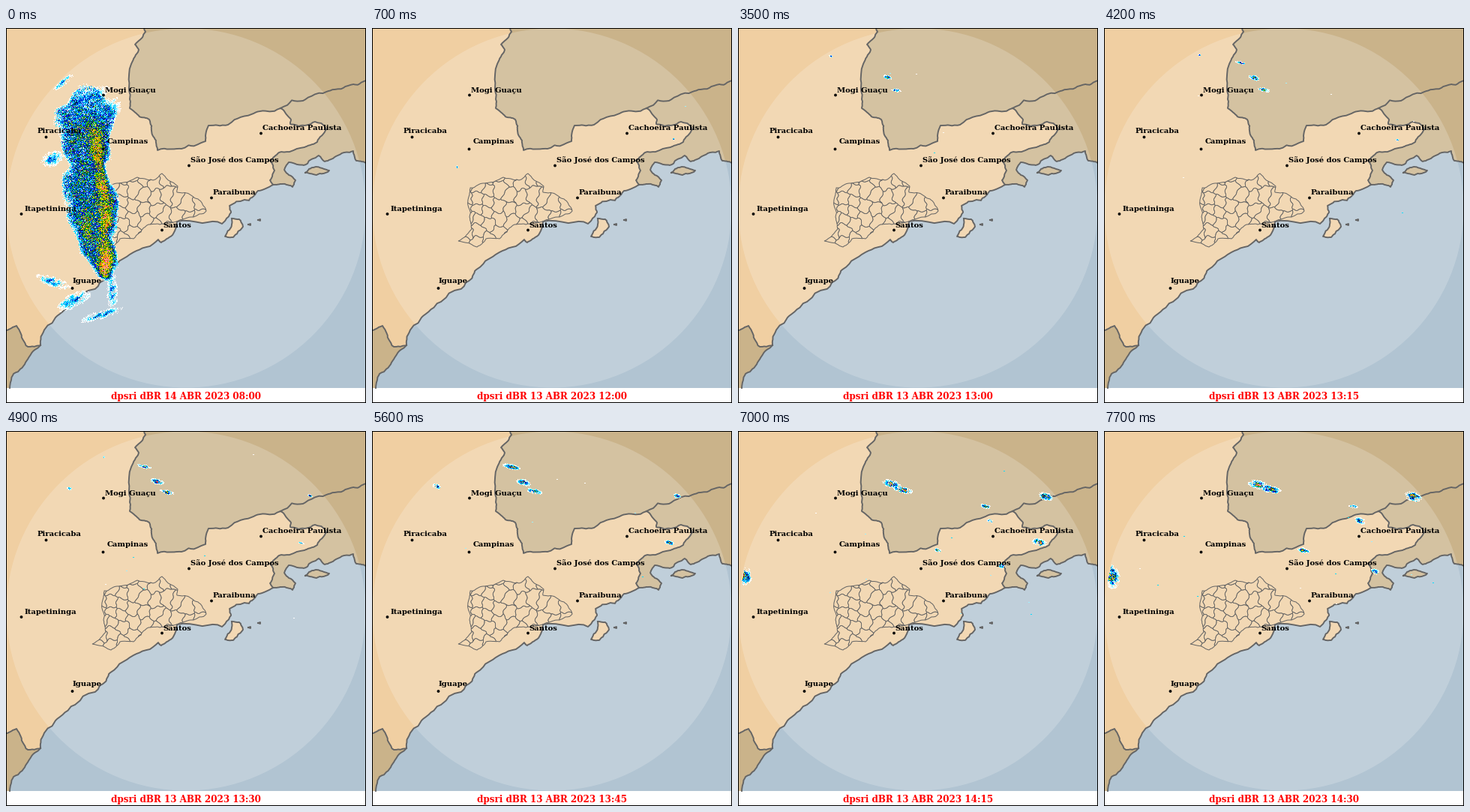
These frames come from a looping animation (480x500 px, 8 s). A matplotlib script:

```python
import numpy as np
import matplotlib.pyplot as plt
from matplotlib.animation import FuncAnimation
from matplotlib.colors import to_rgba

W, H, MAP, DPI = 480, 500, 480, 100
PX = 72 / DPI
STEP, TICK, LOOP = 700, 100, 8000

LAND, NEIGHBOUR, SEA, LINE = "#f0cfa2", "#cab38a", "#b1c4d2", "#646464"
LEVELS = ["#ffffff", "#a0f0ff", "#00dcff", "#00b4ff", "#0078dc", "#0000e6",
          "#00008c", "#006400", "#00a000", "#78d200", "#ffe600", "#ffb400",
          "#ff7800", "#e62800", "#ff8cc8"]
PALETTE = np.array([(1, 1, 1, 0)] + [to_rgba(c) for c in LEVELS])

fig = plt.figure(figsize=(W / DPI, H / DPI), dpi=DPI, facecolor="white")
ax = fig.add_axes([0, 0, 1, 1])
ax.axis("off")
geo = np.random.default_rng(4)


def rough(*points, closed=False, levels=3, amp=0.06):
    """Fractal line: midpoints shift in proportion to segment length."""
    pts = np.array(points + points[:1] * closed, float)
    for _ in range(levels):
        a, b = pts[:-1], pts[1:]
        size = np.hypot(*(b - a).T)[:, None]
        out = np.empty((2 * len(pts) - 1, 2))
        out[::2] = pts
        out[1::2] = (a + b) / 2 + geo.normal(0, amp, a.shape) * size
        pts = out
    return pts


def area(color, *parts):
    ax.fill(*np.vstack(parts).T, color=color, lw=0, zorder=1)


def box(x, y, w, h, color, z):
    ax.add_patch(plt.Rectangle((x, y), w, h, color=color, lw=0, zorder=z))


# Coast, west to east
coast_s = rough((5, 480), (10, 461), (28, 443), (46, 423))
coast_m = rough((46, 423), (48, 409), (66, 386), (92, 365), (133, 334),
                (137, 324), (170, 299), (203, 282), (207, 286), (222, 276),
                (228, 258), (288, 261), (300, 246), (298, 237), (318, 229),
                (324, 230), (336, 217), (356, 209))
coast_e = rough((356, 209), (367, 208), (382, 212), (386, 203), (371, 189),
                (377, 179), (397, 183), (404, 177), (417, 170), (425, 178),
                (440, 171), (463, 164), (467, 177), (480, 180))

# State borders
north = rough((184, 0), (186, 5), (172, 22), (177, 29), (167, 48), (165, 95),
              (165, 107), (180, 119), (191, 122), (194, 137), (200, 150),
              (202, 163), (234, 161), (266, 151), (270, 130), (296, 129),
              (330, 114), (366, 107))
north_e = rough((366, 107), (396, 97), (430, 84), (456, 77), (480, 70))
east = rough((366, 107), (380, 122), (379, 128), (390, 131), (412, 125),
             (427, 135), (415, 152), (398, 159), (364, 166), (352, 177),
             (358, 190), (352, 203), (356, 209))
south = rough((0, 403), (14, 397), (24, 418), (29, 425), (46, 423))

ilhabela = rough((301, 254), (311, 255), (316, 265), (303, 279), (292, 278),
                 (300, 266), closed=True)
ilha_grande = rough((399, 193), (404, 188), (413, 185), (431, 190), (414, 196),
                    closed=True)
islets = [rough((x, y), (x + 3, y - 1), (x + 3, y + 1), closed=True, levels=0)
          for x, y in [(323, 262), (336, 256)]]

box(0, 0, W, MAP, LAND, 0)
area(SEA, coast_s, coast_m, coast_e, [(W, MAP)])
area(NEIGHBOUR, north, north_e, [(W, 0)])
area(NEIGHBOUR, north_e, coast_e[::-1], east[::-1])
area(NEIGHBOUR, south, coast_s[::-1], [(0, MAP)])
area(LAND, ilhabela)
area(NEIGHBOUR, ilha_grande)
ax.add_patch(plt.Circle((240, 240), 239.5, color="white", alpha=0.2, lw=0,
                        zorder=2))
for border in (coast_s, coast_m, coast_e, north, north_e, east, south,
               ilhabela, ilha_grande, *islets):
    ax.plot(*border.T, color=LINE, lw=1.9 * PX, zorder=3)

# Municipal limits: warped cells around jittered centres, denser in the west
metro, = ax.fill(*rough(
    (131, 213), (150, 207), (175, 199), (196, 203), (208, 194), (229, 211),
    (228, 219), (256, 228), (267, 244), (250, 252), (228, 258), (205, 262),
    (190, 262), (180, 272), (170, 281), (152, 281), (140, 292), (115, 284),
    (133, 268), (130, 252), (130, 222), closed=True).T,
    fc="none", ec=LINE, lw=PX, zorder=3)
centres = [(x, y) + geo.normal(0, 2.5, 2)
           for x in range(124, 268, 15)
           for y in np.arange(200, 296, np.interp(x, [120, 170, 260], [12, 18, 30]))]
gy, gx = np.mgrid[190:296, 110:272].astype(float)
wx = gx + 1.3 * np.cos(gy * .55) + np.cos(gx * .4 + gy * .3)
wy = gy + 1.3 * np.cos(gx * .5) + np.cos(gy * .4 - gx * .3)
dist = np.array([np.hypot(wx - x, wy - y) for x, y in centres])
nearest, second = np.sort(dist, axis=0)[:2]
for d in dist:
    gap = d - np.where(d == nearest, second, nearest)
    if gap.min() < 0:
        limit = ax.contour(gx, gy, gap, [0], colors=LINE, linewidths=.75 * PX,
                           zorder=3)
        limit.set_clip_path(metro)

# Towns: name, dot, text offset
towns = [
    ("Mogi Guaçu", 130, 89.5, 2, -4),
    ("Piracicaba", 53.5, 145.5, -12, -6),
    ("Campinas", 129.5, 161.5, 5, -7),
    ("Cachoeira Paulista", 340, 140.5, 2, -4.5),
    ("São José dos Campos", 244, 183.5, 2, -4.5),
    ("Paraibuna", 274, 226.5, 1.5, -4.5),
    ("Itapetininga", 20.5, 248, 4.5, -4.5),
    ("Santos", 208, 269.5, 1.5, -4),
    ("Iguape", 88.5, 347, .5, -7),
]
FONT = dict(family="DejaVu Serif", weight="bold", va="baseline", zorder=6)
for name, x, y, dx, dy in towns:
    ax.add_patch(plt.Circle((x, y), 1.9, color="black", lw=0, zorder=6))
    ax.text(x + dx, y + dy, name, size=10 * PX, color="black", **FONT)
title = ax.text(W / 2, 495, "", size=12 * PX, color="#ff0000", ha="center",
                **FONT)
for edge in [(0, 0, W, 1), (0, H - 1, W, 1), (0, 0, 1, H), (W - 1, 0, 1, H)]:
    box(*edge, "black", 7)

# Cells: first and last step, start, end, width then, aspect
tracks = [
    (3, 11, 197, 63, 205, 71, 8, 22, .45),
    (5, 11, 211, 83, 221, 77, 12, 24, .35),
    (6, 9, 182, 46, 187, 48, 12, 24, .3),
    (2, 7, 113, 41, 130, 34, 9, 3, .4),
    (1, 3, 113, 185, 128, 167, 3, 5, 1.4),
    (1, 4, 402, 148, 399, 149, 4, 8, .9),
    (6, 10, 391, 149, 401, 148, 5, 17, .5),
    (7, 11, 405, 86, 412, 87, 6, 19, .6),
    (9, 11, 8, 192, 10, 193, 12, 18, 1.5),
    (9, 11, 328, 100, 332, 100, 14, 11, .4),
    (9, 11, 330, 120, 341, 119, 5, 13, .6),
    (9, 11, 266, 158, 266, 159, 5, 14, .5),
    (9, 11, 342, 172, 361, 187, 9, 10, .7),
    (7, 9, 84, 76, 88, 70, 7, 14, .7),
]
# Outskirts of the storm: centre, size, slope
outskirts = [(76, 72, 26, 10, -.7), (106, 94, 60, 22, -.4),
             (134, 112, 36, 34, -.5), (62, 174, 30, 20, -.2),
             (62, 338, 44, 14, .3), (90, 363, 46, 20, -.4),
             (126, 382, 54, 12, -.3), (141, 350, 14, 50, 0)]

Y, X = np.mgrid[:MAP, :MAP].astype(float)
in_range = np.hypot(X - 239.5, Y - 239.5) < 238


def waves(rng, k):
    """Smooth random field of about unit size."""
    return sum(np.cos(X * kx + Y * ky + p) for kx, ky, p in
               zip(rng.normal(0, k, 8), rng.normal(0, k, 8),
                   rng.uniform(0, 2 * np.pi, 8))) / 2


def cell(x, y, w, h, peak, slope, texture):
    dx = X - x
    q = (2 * dx / w) ** 2 + (2 * (Y - y - slope * dx) / h) ** 2
    return peak * np.exp(-1.7 * q) * texture


def drift(step, texture, rng):
    """Scattered cells that move and grow along their tracks."""
    v = np.zeros(X.shape)
    for s0, s1, x0, y0, x1, y1, w0, w1, aspect in tracks:
        if s0 <= step <= s1:
            u = (step - s0) / (s1 - s0)
            w = w0 + (w1 - w0) * u
            v = np.maximum(v, cell(x0 + (x1 - x0) * u, y0 + (y1 - y0) * u, w,
                                   max(w * aspect, 3), 2.7 * np.sqrt(w), .2,
                                   texture))
    for _ in range(step):
        x, y = rng.integers(40, 440), rng.integers(30, 250)
        v[y, x:x + 2] = rng.uniform(1, 4)
    return v


def storm(texture, rng):
    """Long north-south rain band with a hot core."""
    rows = [80, 110, 180, 250, 337]
    left = np.interp(Y, rows, [98, 66, 77, 79, 120])
    right = np.interp(Y, rows, [125, 144, 137, 149, 145])
    depth = np.minimum.reduce([X - left, right - X, Y - 80, 337 - Y])
    depth += 3 * waves(rng, .2)
    core = np.interp(Y, [120, 200, 265, 335], [113, 129, 134, 131])
    heat = 4.6 * np.clip((Y - 110) / 35, 0, 1) + 3 * np.exp(-((Y - 312) / 12) ** 2)
    heat *= np.exp(-((X - core) / 10) ** 2)
    heat += 3.5 * np.exp(-((X - 108) / 8) ** 2 - ((Y - 268) / 28) ** 2)
    body = np.interp(Y, [85, 135], [4.2, 6.6])
    v = body * (1 - np.exp(-np.maximum(depth + 1, 0) / 5))
    v += (heat + .7 * waves(rng, .35)) * np.clip(depth / 6, 0, 1)
    v += rng.normal(0, 2.3, X.shape) * np.clip((depth + 4) / 8, 0, 1)
    for x, y, w, h, slope in outskirts:
        v = np.maximum(v, cell(x, y, w, h, 5.5, slope, texture))
    return v


def radar(step):
    rng = np.random.default_rng(20 + step)
    texture = .75 + .3 * waves(rng, .6) + rng.uniform(-.5, .5, X.shape)
    v = drift(step, texture, rng) if step else storm(texture, rng)
    level = np.clip(v, 0, len(LEVELS)).astype(int)
    return PALETTE[np.where(in_range, level, 0)]


def stamp(step):
    if step == 0:
        return "dpsri dBR 14 ABR 2023 08:00"
    h, m = divmod(12 * 60 + 15 * (step - 1), 60)
    return f"dpsri dBR 13 ABR 2023 {h:02d}:{m:02d}"


scans = [radar(s) for s in range(LOOP // STEP + 1)]
rain = ax.imshow(scans[0], extent=(0, MAP, MAP, 0), interpolation="nearest",
                 aspect="auto", zorder=4)
ax.set_xlim(0, W)
ax.set_ylim(H, 0)


def update(frame):
    step = frame * TICK // STEP
    rain.set_data(scans[step])
    title.set_text(stamp(step))
    return rain, title


anim = FuncAnimation(fig, update, frames=LOOP // TICK, interval=TICK,
                     repeat=True, repeat_delay=0)
plt.show()
```
